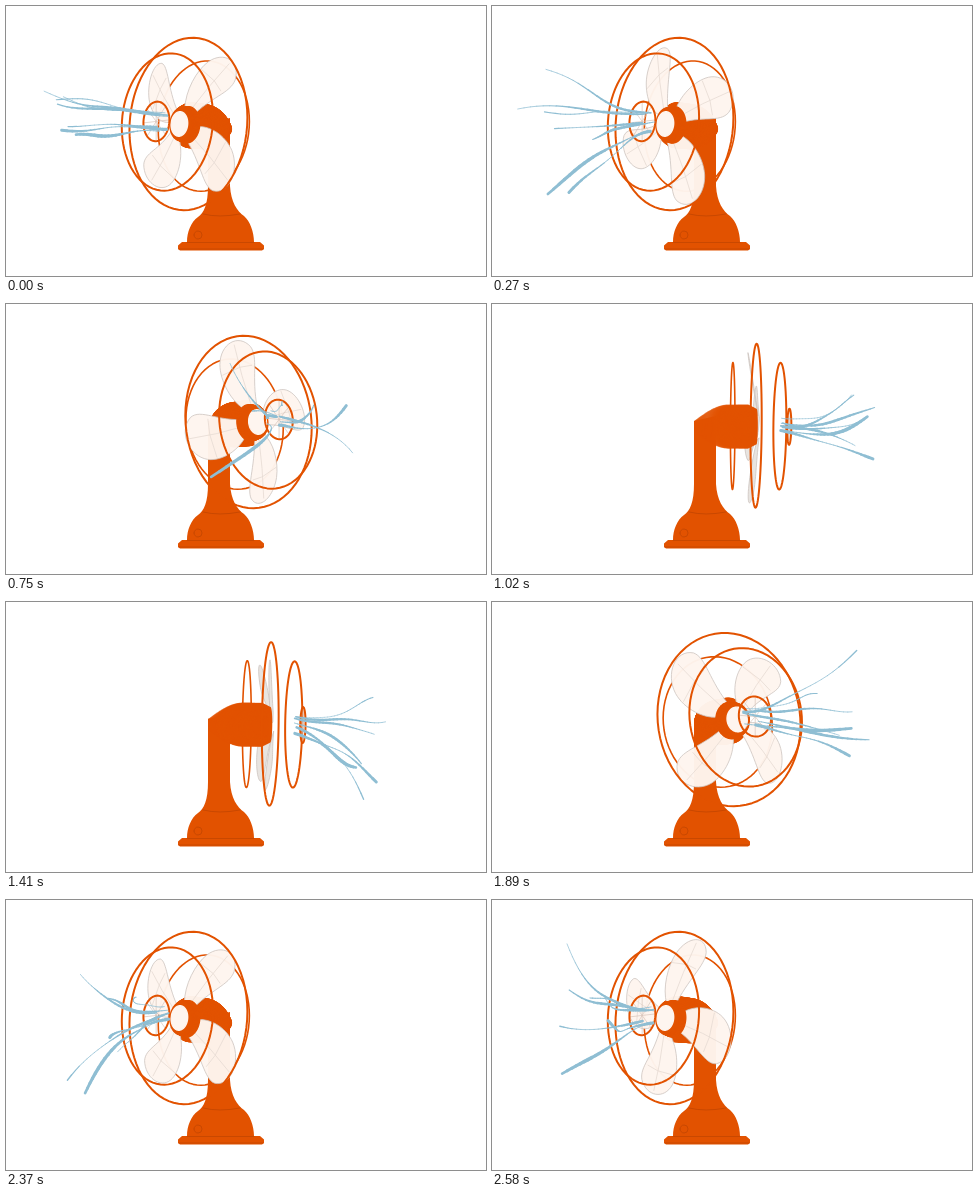
An HTML page with a canvas for the animation above (2610 ms loop, 480 by 270 pixels).

```html
<!DOCTYPE html>
<html>
<head>
<meta charset="utf-8">
<title>Oscillating fan</title>
<style>
html, body { margin: 0; width: 100%; height: 100%; overflow: hidden; background: #fff; }
canvas { display: block; }
</style>
</head>
<body>
<canvas id="stage" width="480" height="270"></canvas>
<script>
const ctx = document.getElementById('stage').getContext('2d');
const LOOP = 2610, STEP = 30, TAU = Math.PI * 2;
const ORANGE = '#e25200', SHADE = '#c94800', BLUE = '#8fbed3';
const PIVOT = 214, AXIS = 122.5, EYE_X = 240, EYE_Y = 195, DISTANCE = 700;
let sinYaw, cosYaw;

const ease = x => 0.5 - 0.5 * Math.cos(Math.PI * Math.min(1, Math.max(0, x)));

function turnTo(t) {
  const turn = ease((t - 300) / 780) - ease((t - 1530) / 780);
  const yaw = (-42 + 136 * turn) * Math.PI / 180;
  sinYaw = Math.sin(yaw);
  cosYaw = Math.cos(yaw);
}

// u, v lie in the plane of the rings, d runs along the fan's axis
function project(u, v, d) {
  const x = PIVOT + d * sinYaw + u * cosYaw;
  const scale = DISTANCE / (DISTANCE - d * cosYaw + u * sinYaw);
  return [EYE_X + (x - EYE_X) * scale, EYE_Y + (AXIS - v - EYE_Y) * scale];
}

function circle(r, d) {
  ctx.beginPath();
  for (let i = 0; i < 72; i++) {
    const a = i / 72 * TAU;
    ctx.lineTo(...project(r * Math.cos(a), r * Math.sin(a), d));
  }
  ctx.closePath();
}

function ring(r, d, width) {
  circle(r, d);
  ctx.strokeStyle = ORANGE;
  ctx.lineWidth = width;
  ctx.stroke();
}

// The outline keeps edge-on discs solid
function disc(r, d, color) {
  circle(r - 0.7, d);
  ctx.fillStyle = ctx.strokeStyle = color;
  ctx.lineWidth = 1.4;
  ctx.fill();
  ctx.stroke();
}

function line(points, color, width) {
  ctx.beginPath();
  points.forEach(p => ctx.lineTo(...p));
  ctx.strokeStyle = color;
  ctx.lineWidth = width;
  ctx.stroke();
}

function stand() {
  ctx.fillStyle = ORANGE;
  ctx.fill(new Path2D('M202 117L224 112V180C225 196 231 205 238 210C244 215 248 226 248 236H254L258 239.5V243L256 244.5H174L172 243V239.5L176 236H181C181 226 185 216 192 211C198 207 202 198 202 180Z'));
  ctx.strokeStyle = SHADE;
  ctx.lineWidth = 1;
  ctx.stroke(new Path2D('M181 236.5H248M173 243H257M188 229a4 4 0 1 0 8 0a4 4 0 1 0-8 0M197 208Q213 212 234 208'));
}

function motor() {
  for (let d = -11; d <= 50; d++) {
    const back = Math.min(1, (d + 11) / 34);
    disc(d < 42 ? 6 + 16 * Math.sin(back * Math.PI / 2) : 22 - (d - 42) * 0.5, d, ORANGE);
  }
}

function blade(angle, side) {
  const s = Math.sin(angle), c = Math.cos(angle);
  const at = (r, w) => project(r * s + w * c, r * c - w * s, 54 - 0.15 * r + 0.09 * w);
  const curve = (...p) => ctx.bezierCurveTo(...at(p[0], p[1]), ...at(p[2], p[3]), ...at(p[4], p[5]));
  ctx.beginPath();
  ctx.moveTo(...at(13, -7));
  curve(24, -21, 46, -25, 60, -19);
  curve(78, -11, 84, 13, 69, 22);
  curve(57, 27, 42, 11, 13, 6);
  ctx.closePath();
  ctx.fillStyle = side ? '#e8e4e0' : 'rgba(254,245,239,.97)';
  ctx.fill();
  ctx.strokeStyle = '#cdc4bf';
  ctx.lineWidth = 0.8;
  ctx.stroke();
  if (!side) {
    line([at(15, 0), at(45, 1), at(74, 4)], '#e6dbd4', 0.8);
    line([at(50, -20), at(53, 2), at(52, 16)], '#e6dbd4', 0.8);
  }
}

function blades(t, side) {
  const spin = (43 + 1980 * t / LOOP) * Math.PI / 180;
  for (let i = 0; i < 4; i++) blade(spin + i * TAU / 4, side);
}

function hub() {
  for (let d = 45; d <= 53; d++) disc(18 - (d - 45) * 0.25, d, ORANGE);
  disc(12.2, 55, '#fef5ef');
}

function guard() {
  ring(81.2, 49.5, 2);
  ring(63, 73.5, 2);
  for (let i = 0; i < 4; i++) {
    const a = i * TAU / 8, u = 17 * Math.cos(a), v = 17 * Math.sin(a);
    line([project(u, v, 83.5), project(-u, -v, 83.5)], '#d8c5bb', 0.7);
  }
  ring(18, 83.5, 2);
}

// Ribbons leave the nozzle, fan out and trail behind the turning head
function wind(t) {
  const spread = 0.2 + 0.8 * ease(t / 420);
  const phase = t / LOOP * TAU;
  for (let i = 0; i < 7; i++) {
    const angle = i * 2.4 + 0.7 + 0.5 * Math.sin(phase * 2 + i * 1.7);
    const reach = 58 + 34 * Math.abs(Math.sin(i * 2.1 + 1 + phase)) + 36 * (1 - spread);
    const width = 0.5 + 2.6 * Math.abs(Math.sin(i * 1.9 + 0.6));
    const drift = spread * (40 + 25 * Math.sin(i * 3.3 + phase));
    let last;
    for (let k = 0; k <= 24; k++) {
      const f = k / 24;
      const bend = angle + f * spread * 0.9 * Math.sin(i * 4.1 + phase * 3);
      const r = 9 + drift * f ** 1.8 + 4 * f * Math.sin(f * 7 + i - phase * 6);
      turnTo(t - 90 * f);
      const p = project(r * Math.cos(bend), r * Math.sin(bend) - 18 * f * spread, 76 + reach * f);
      if (last) line([last, p], BLUE, width * (0.55 + 0.45 * Math.sin(f * 5 + i)) + 0.5);
      last = p;
    }
  }
}

function draw() {
  const t = Math.floor(performance.now() % LOOP / STEP) * STEP;
  turnTo(t);
  const side = cosYaw < 0.17;
  ctx.fillStyle = '#fff';
  ctx.fillRect(0, 0, 480, 270);
  ring(63, 26.5, 1.6);
  stand();
  if (side) blades(t, true);
  motor();
  if (!side) {
    blades(t, false);
    hub();
  }
  guard();
  wind(t);
  requestAnimationFrame(draw);
}

ctx.lineCap = ctx.lineJoin = 'round';
draw();
</script>
</body>
</html>
```
